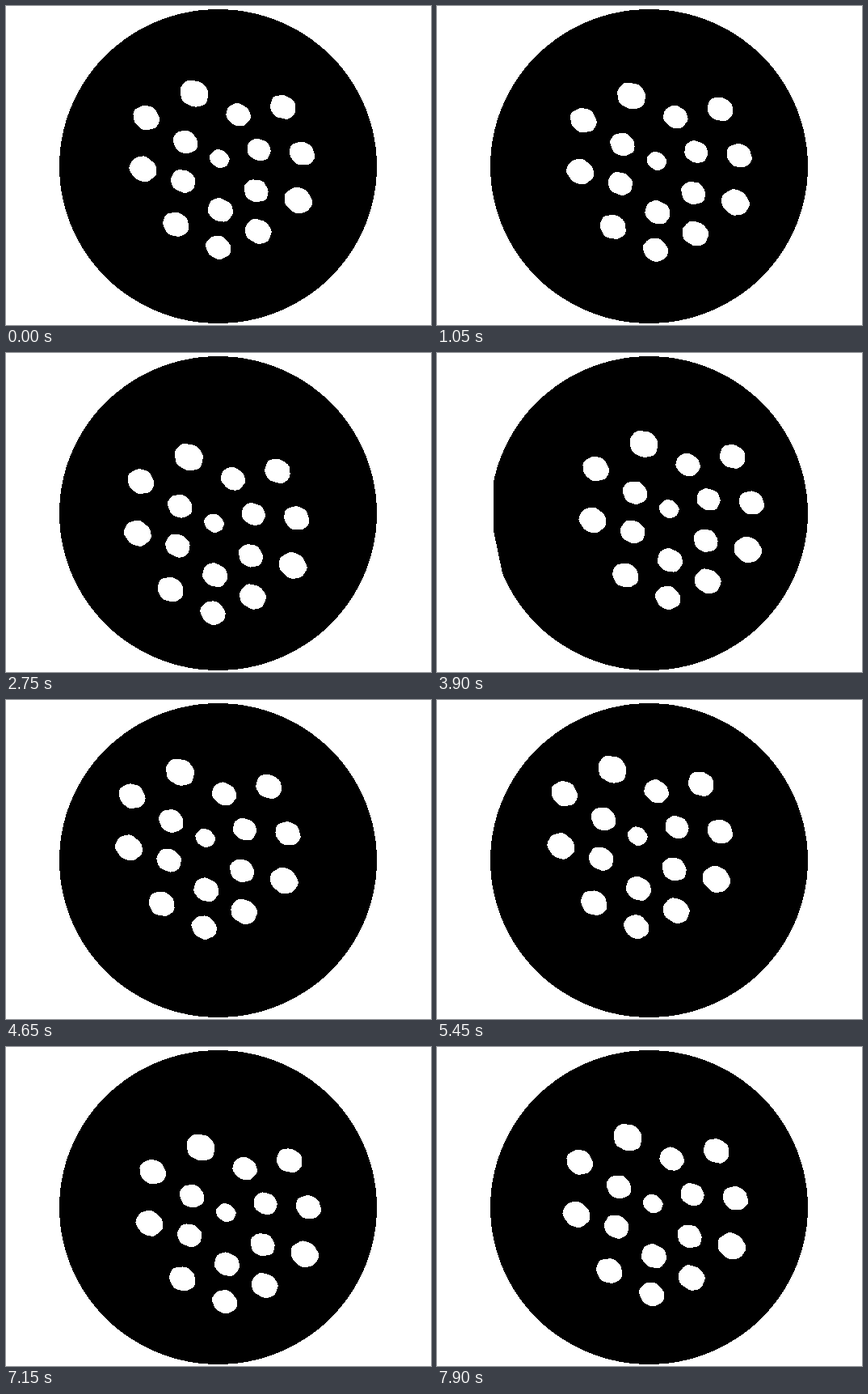
Write an HTML page with a canvas that moves like this. It is 526 px wide and 394 px high and loops after 8 s.

```html
<!DOCTYPE html>
<html lang="en">
<head>
<meta charset="utf-8">
<title>Drifting dots</title>
<style>
html, body { margin: 0; width: 100%; height: 100%; overflow: hidden; background: #fff; }
canvas { display: block; }
</style>
</head>
<body>
<canvas id="stage" width="526" height="394"></canvas>
<script>
const W = 526, H = 394, LOOP = 8000, STEP = 50;
const PIVOT = { x: 264, y: 188 };
const TILT = Math.PI / 6, STRETCH = 1.07;
const ctx = document.getElementById('stage').getContext('2d', { willReadFrequently: true });

// x, y, radius
const dots = [
  [233, 108.3, 17], [173.6, 138.6, 15.6], [287.6, 134.2, 14.4], [342.8, 124.3, 15.3],
  [222, 168.3, 14.6], [264.2, 188.6, 11.6], [313, 177.2, 14], [366.4, 181.6, 15],
  [169.6, 201.9, 16], [219.2, 216.6, 14.6], [309.6, 228, 14.5], [361.7, 239.5, 16.4],
  [265.4, 252, 14.9], [210.3, 270.1, 15.5], [262.8, 298.3, 14.8], [312.1, 278.1, 15.6]
];

// Turning points of the drift: time, dx, dy
const drift = [
  [0, 0, 0], [400, -15, 6], [1300, 17, 0], [1850, 22, -13], [2750, -6.7, 21.5],
  [2950, -2, 29], [3400, 22, 18], [3900, 23, 4], [4700, -18, -19], [5450, -16, -20.5],
  [5650, -17, -23], [6000, -11, 14], [6380, 22, 18], [7150, 8, 16],
  [7700, -2, -5], [7900, 3, 5], [8000, 4, 7]
];

// Smooth curve through the turning points, without overshoot
function sample(keys, t) {
  let i = 0;
  while (i < keys.length - 2 && t >= keys[i + 1][0]) i++;
  const p = keys[i], q = keys[i + 1];
  const before = keys[i - 1] || p, after = keys[i + 2] || q;
  const span = q[0] - p[0], u = (t - p[0]) / span;
  const slope = (l, m, r, k) => (m[k] - l[k]) * (r[k] - m[k]) <= 0 ? 0
    : (r[k] - l[k]) / (r[0] - l[0]) * span;
  return [1, 2].map(k => {
    const a = p[k], b = q[k], m = slope(before, p, q, k), n = slope(p, q, after, k);
    const d = b - a;
    return a + u * (m + u * (3 * d - 2 * m - n + u * (m + n - 2 * d)));
  });
}

function blob([x, y, r], seed) {
  ctx.beginPath();
  for (let i = 0; i < 48; i++) {
    const a = i * Math.PI / 24;
    const rough = r * (1 + .02 * Math.sin(4 * a + seed * 2) + .018 * Math.sin(7 * a + seed * 5));
    const px = rough * STRETCH * Math.cos(a), py = rough / STRETCH * Math.sin(a);
    ctx.lineTo(x + px * Math.cos(TILT) - py * Math.sin(TILT),
      y + px * Math.sin(TILT) + py * Math.cos(TILT));
  }
  ctx.fill();
}

// Dark plate whose left side shows when it drifts far to the right
function plate() {
  const edge = [[60, 90], [47, 150], [46.5, 212], [59, 272], [59.5, 286], [75, 310]];
  ctx.beginPath();
  ctx.moveTo(700, -300);
  ctx.lineTo(60, -300);
  edge.forEach(p => ctx.lineTo(...p));
  ctx.lineTo(75, 700);
  ctx.lineTo(700, 700);
  ctx.fill();
}

// Keep only pure black and white, with hard pixel edges
function harden() {
  const image = ctx.getImageData(0, 0, W, H), d = image.data;
  for (let i = 0; i < d.length; i += 4) d[i] = d[i + 1] = d[i + 2] = d[i] > 127 ? 255 : 0;
  ctx.putImageData(image, 0, 0);
}

function draw(t) {
  const [dx, dy] = sample(drift, t);
  const lean = .006 - .0005 * dx;
  const swell = .0105 * Math.min(1, t / 5000) * (1 + Math.cos(2 * Math.PI * t / 2720));
  ctx.fillStyle = '#fff';
  ctx.fillRect(0, 0, W, H);
  ctx.save();
  ctx.beginPath();
  ctx.ellipse(262.5, 198, 196.5, 194, 0, 0, 2 * Math.PI);
  ctx.clip();
  ctx.translate(PIVOT.x + dx, PIVOT.y + dy);
  ctx.transform(1, lean, 0, 1 + swell, 0, 0);
  ctx.translate(-PIVOT.x, -PIVOT.y);
  ctx.fillStyle = '#000';
  plate();
  ctx.fillStyle = '#fff';
  dots.forEach(blob);
  ctx.restore();
  harden();
}

let shown = -1;
function tick() {
  const t = Math.floor(performance.now() % LOOP / STEP) * STEP;
  if (t !== shown) draw(shown = t);
  requestAnimationFrame(tick);
}
tick();
</script>
</body>
</html>
```
